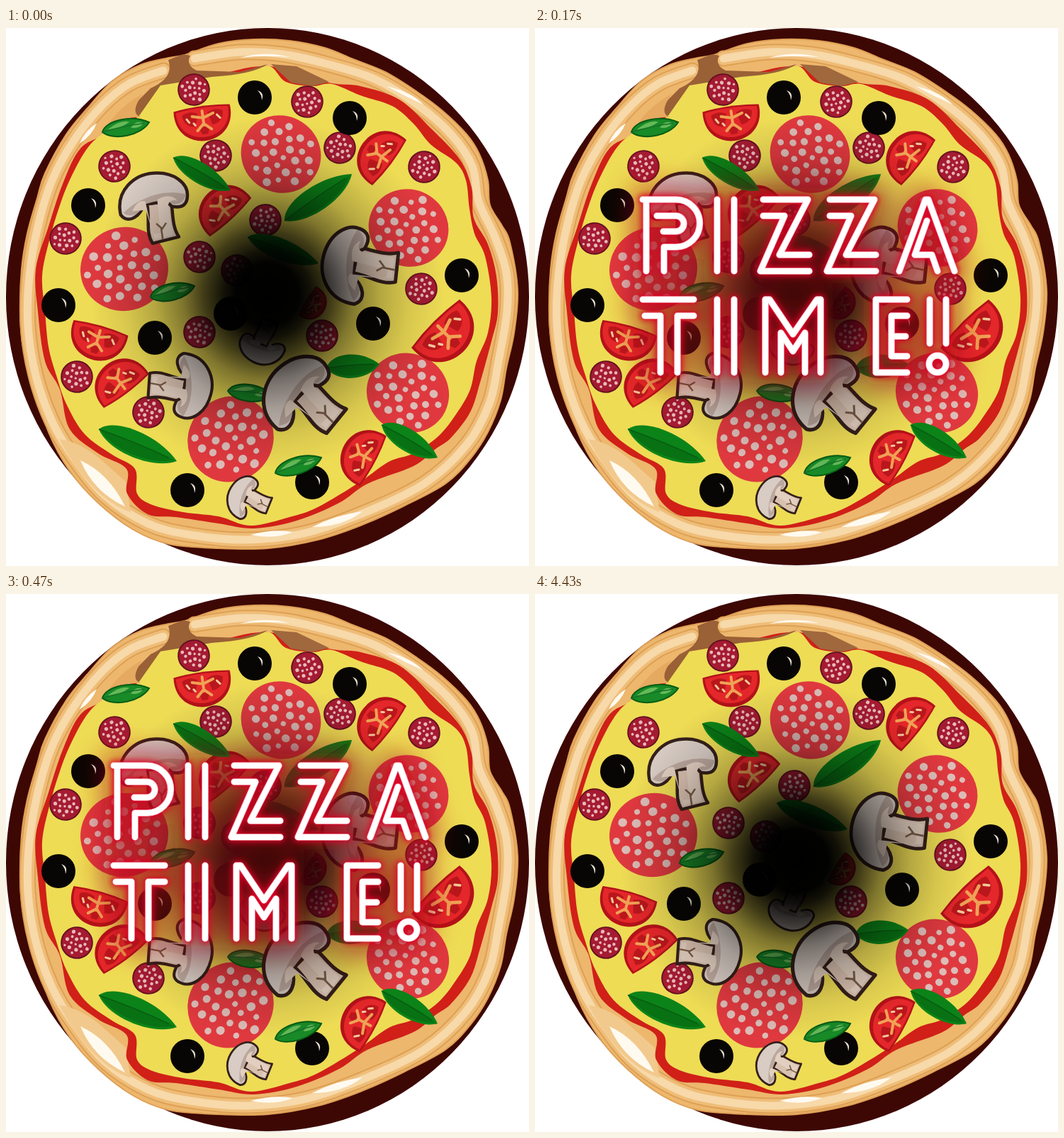
Recreate the animation shown at these times as an HTML page. Size 738 by 759 pixels, loop 5010 ms.

```html
<!DOCTYPE html>
<html lang="en">
<head>
<meta charset="utf-8">
<title>Pizza time!</title>
<style>
html, body { margin: 0; width: 100%; height: 100%; overflow: hidden; background: #fff; }
svg { display: block; width: 100vw; height: 100vh; }
</style>
</head>
<body>
<svg id="stage" viewBox="0 0 738 759" preserveAspectRatio="none"></svg>
<script>
const place = (x, y, angle, scale, art) =>
  `<g transform="translate(${x} ${y}) rotate(${angle}) scale(${scale})">${art}</g>`;
const path = (d, attrs) => `<path d="${d}" ${attrs}/>`;
const each = (list, draw) => list.map(item => draw(...item)).join('');

// Catmull-Rom curve through "x,y x,y ..." points
function smooth(text, closed = true) {
  const p = text.trim().split(/\s+/).map(s => s.split(',').map(Number));
  const n = p.length;
  const at = i => closed ? p[(i + n) % n] : p[Math.max(0, Math.min(n - 1, i))];
  let d = `M${p[0]}`;
  for (let i = 0; i < (closed ? n : n - 1); i++) {
    const [a, b, c, e] = [at(i - 1), at(i), at(i + 1), at(i + 2)];
    d += `C${b.map((v, k) => v + (c[k] - a[k]) / 6)} ${c.map((v, k) => v - (e[k] - b[k]) / 6)} ${c}`;
  }
  return closed ? d + 'Z' : d;
}

// Evenly scattered fat spots inside a slice
function spots(count, radius, size, color) {
  let out = '';
  for (let i = 0; i < count; i++) {
    const r = radius * Math.sqrt((i + .4) / count), a = i * 2.4 + .5;
    const s = size * (.75 + .45 * Math.abs(Math.sin(i * 5.3)));
    out += `<circle cx="${(r * Math.cos(a)).toFixed(1)}" cy="${(r * Math.sin(a)).toFixed(1)}" r="${s.toFixed(1)}" fill="${color}"/>`;
  }
  return out;
}

const pepperoniArt = '<circle r="57" fill="#df393f"/>' + spots(27, 49, 4.9, '#dcbcb7');
const salamiArt = '<circle r="21" fill="#a51b32" stroke="#641020" stroke-width="1.8"/>' + spots(17, 17, 2.1, '#e8b9b9');
const oliveArt = '<circle r="24" fill="#080604"/>' + path('M4,-10Q14,-7 10,4Q10,-4 4,-10Z', 'fill="#e5ddd0"');
const tomatoArt =
  path('M-40,0Q0,-6 40,0C46,62 -46,62 -40,0Z', 'fill="#b41219"') +
  path('M-37,2Q0,-3 37,2C40,54 -40,54 -37,2Z', 'fill="#e4272a"') +
  path('M-29,7Q-18,1 -7,7L-12,25Q-28,24 -29,7ZM29,7Q18,1 7,7L12,25Q28,24 29,7ZM-7,29Q0,24 7,29L4,37H-4Z', 'fill="#b9171c"') +
  path('M0,4V24M0,14L-15,10M0,14L15,9M0,22L-10,31M0,22L10,31', 'fill="none" stroke="#efa255" stroke-width="4" stroke-linecap="round"') +
  path('M-23,13l3,5M20,12l4,5M-14,20l2,3', 'stroke="#f5c89a" stroke-width="3" stroke-linecap="round"');
const mushroomArt =
  path('M-10,0C-9,24 -18,38 -10,56L28,52C20,36 25,16 24,0Z', 'fill="#d9c1b0" stroke="#35201a" stroke-width="4.5" stroke-linejoin="round"') +
  path('M-49,10C-52,-25 -22,-44 5,-42C35,-40 51,-20 48,-4C46,9 38,13 24,8L18,0L-15,0C-20,14 -40,26 -49,10Z', 'fill="#d8ccc4" stroke="#35201a" stroke-width="4.5" stroke-linejoin="round"') +
  path('M-45,8C-25,-8 15,-20 46,-6Q40,8 25,5L18,-4L-15,0Q-28,21 -45,8Z', 'fill="#bba79d"') +
  path('M-32,7Q-22,-9 -12,-4L-8,43L3,43L5,-4Q24,-12 33,1Q22,-3 19,6L20,48L-6,51L-13,8Z', 'fill="#e2cfc0"') +
  path('M5,52V36L-1,29M5,39L13,30', 'fill="none" stroke="#785a46" stroke-width="2.5"');

function leaf(x1, y1, x2, y2, width, light) {
  const dx = x2 - x1, dy = y2 - y1, len = Math.hypot(dx, dy), w = width * .72;
  const shape = `M0,0C${len * .12},${-w} ${len * .68},${-w} ${len},0C${len * .78},${w} ${len * .2},${w} 0,0Z`;
  const vein = path(`M0,0Q${len / 2},-3 ${len * .9},0`, `fill="none" stroke="${light ? '#16702a' : '#075d12'}" stroke-width="1.5"`);
  const shine = light ? path(`M${len * .12},-2Q${len * .42},${-w * .8} ${len * .6},${-w * .4}Q${len * .4},0 ${len * .12},-2ZM${len * .6},2Q${len * .75},${-w * .5} ${len * .88},0Q${len * .75},${w * .4} ${len * .6},2Z`, 'fill="#65b957"')
    : path(`M3,0Q${len / 2},-3 ${len * .96},0C${len * .75},${w * .8} ${len * .22},${w * .8} 3,0Z`, 'fill="#087113"');
  return place(x1, y1, Math.atan2(dy, dx) * 180 / Math.PI, 1,
    path(shape, light ? 'fill="#188a27" stroke="#075c14" stroke-width="2"' : 'fill="#0c8318"') + shine + vein);
}

const crust = smooth(`252,38 300,22 350,16 400,18 450,28 490,44 535,62 580,90 615,116 650,150
  668,178 680,215 683,250 700,279 711,302 722,370 717,430 706,480 698,525 680,570 655,608 620,643
  560,675 500,702 440,722 370,734 300,734 230,728 180,708 130,670 90,625 60,570 38,500 24,450
  20,400 22,340 30,290 44,240 55,205 85,150 115,113 150,75 190,52 230,42`);
const sauce = smooth(`215,82 290,68 370,54 455,77 500,82 555,101 600,142 640,185 657,225 660,268
  680,305 692,350 694,402 685,442 669,500 655,542 628,578 606,594 575,618 510,643 470,670 410,695
  350,706 300,699 240,690 200,686 171,657 170,622 130,600 90,566 76,510 55,470 45,400 42,340
  60,280 80,220 105,170 145,145`);
const cheese = smooth(`215,80 290,68 340,62 372,54 395,76 432,82 460,79 500,95 545,110 575,135
  600,165 635,190 649,215 654,255 661,290 676,322 685,380 680,430 664,470 655,510 635,545 610,576
  575,600 540,612 500,640 440,676 400,690 345,702 300,689 250,683 207,673 185,657 182,622 150,602
  111,573 85,530 71,490 60,450 55,400 51,350 61,300 76,250 92,210 116,168 142,146 185,126`);
const doughLine = smooth(`266,43 330,34 390,37 450,50 520,72 580,108 628,150 658,195 667,245
  690,295 706,345 707,400 695,470 682,530 650,588 590,643 500,686 420,713 340,722 260,715 200,699
  140,660 95,605 65,555 42,490 31,420 33,350 45,280 65,215 95,160 135,110 175,78 222,60`, false);

const dough =
  path(crust, 'fill="#edb76d" stroke="#dfa057" stroke-width="2"') +
  path(doughLine, 'fill="none" stroke="#dda054" stroke-width="23" stroke-linecap="round"') +
  path(doughLine, 'fill="none" stroke="#efbd78" stroke-width="19" stroke-linecap="round"') +
  path(doughLine, 'fill="none" stroke="#f7d9aa" stroke-width="11" stroke-linecap="round"') +
  path('M75,580Q105,584 134,609L169,640L176,683Q120,664 75,580Z', 'fill="#f2c98c"') +
  path('M105,610Q145,628 168,675Q124,655 105,610ZM104,163Q110,146 128,134Q122,151 104,163ZM330,42Q365,32 401,41Q365,38 330,42ZM432,704Q464,687 503,682Q475,704 432,704ZM345,715Q378,706 405,711Q379,722 345,715ZM537,82Q572,90 589,108Q562,96 537,82Z', 'fill="#fffaf0"');
const folds =
  path('M229,45L250,37L260,39Q253,52 269,60L330,62L369,51Q350,65 290,69L218,81L187,125L168,121L204,85Q238,70 229,45Z', 'fill="#9a6036"') +
  path('M374,51L410,54L456,76L432,82L402,77Z', 'fill="#9f683d"') +
  path('M138,146Q157,112 193,93Q173,121 191,126Q165,124 138,146Z', 'fill="#e5a960"');

const toppings =
  each([[388, 178, 1], [568, 282, 1], [167, 340, 1.09], [567, 515, 1.03], [317, 580, 1.09]],
    (x, y, s) => place(x, y, x, `${s} ${s * .95}`, pepperoniArt)) +
  each([[265, 87], [425, 104], [471, 169], [590, 196], [153, 195], [296, 180], [84, 297], [366, 271],
    [273, 323], [586, 368], [273, 429], [446, 434], [100, 492], [201, 542], [326, 342]],
    (x, y) => place(x, y, x, 1.04, salamiArt)) +
  each([[351, 98], [485, 127], [116, 250], [74, 391], [643, 349], [210, 437], [518, 417], [432, 641],
    [256, 652], [317, 403]], (x, y) => place(x, y, 0, 1, oliveArt)) +
  each([[276, 113, -8, 1], [541, 190, 127, 1], [317, 267, 137, 1], [134, 423, 16, 1], [606, 417, -45, 1.2],
    [170, 512, 143, 1], [518, 611, 118, 1], [425, 385, -60, .6]],
    (x, y, a, s) => place(x, y, a, s, tomatoArt)) +
  each([[236, 183, 317, 229, 27], [393, 272, 488, 206, 33], [341, 295, 441, 332, 28], [131, 566, 241, 611, 34],
    [530, 560, 609, 606, 29], [452, 480, 527, 474, 31], [136, 147, 202, 133, 22, true],
    [204, 380, 266, 364, 22, true], [313, 512, 376, 518, 22, true], [380, 628, 445, 606, 22, true]], leaf) +
  each([[209, 247, -8, 1], [492, 335, -78, 1.09], [252, 505, 100, .92], [415, 518, -45, 1.15],
    [362, 447, 204, .65], [339, 663, -62, .62]], (x, y, a, s) => place(x, y, a, s, mushroomArt));

const zed = x => `M${x},242h63l-40,78h42M${x},265h30l-34,78h69`;
const lettering = 'M152,242H199a33.5,33.5 0 0 1 0,67H182V343M157,242V343M172,265H199a11,11 0 0 1 0,22H181' +
  'M257,242V343M281,242V343' + zed(322) + zed(416) +
  'M514,343L551,242H555L592,343M553,272L536,320H560L568,343' +
  'M152,383H224M155,406H177V486M224,406H201V486M257,383V486M281,383V486' +
  'M325,486V383H331L364,432L398,383H403V486M347,486V430L364,456L381,430V486' +
  'M525,383H481V486H525M525,406H503V463H525M503,435H523' +
  'M557,383V445M580,383V445M556,474a12,12 0 1 0 24,0a12,12 0 1 0 -24,0';
const tube = (color, width, extra = '') => path(lettering, `stroke="${color}" stroke-width="${width}" ${extra}`);

const shade = [[0, 1], [45, .99], [62, .92], [90, .73], [120, .47], [160, .24], [200, .1], [250, 0]]
  .map(([r, o]) => `<stop offset="${r / 250}" stop-opacity="${o}"/>`).join('');

document.getElementById('stage').innerHTML = `
  <defs>
    <radialGradient id="shade" gradientUnits="userSpaceOnUse" cx="369" cy="376" r="250">${shade}</radialGradient>
    <filter id="halo" filterUnits="userSpaceOnUse" x="0" y="80" width="738" height="570"><feGaussianBlur stdDeviation="20"/></filter>
    <filter id="edge" filterUnits="userSpaceOnUse" x="100" y="190" width="540" height="350"><feGaussianBlur stdDeviation="4"/></filter>
  </defs>
  <ellipse cx="369" cy="379" rx="369" ry="379" fill="#3d0704"/>
  ${dough}${path(sauce, 'fill="#d02018"')}${path(cheese, 'fill="#eedc55"')}${folds}${toppings}
  <circle cx="369" cy="376" r="250" fill="url(#shade)"/>
  <g id="neon" role="img" aria-label="PIZZA TIME!" fill="none" stroke-linecap="round" stroke-linejoin="round">
    ${tube('#a90719', 34, 'filter="url(#halo)" opacity=".65"')}
    ${tube('#e00025', 13, 'filter="url(#edge)"')}
    ${tube('#f7a3b0', 9.5)}${tube('#fff', 8)}
  </g>`;

// Neon brightness from each moment on, in ms
const flicker = [[0, 0], [30, .35], [60, .7], [100, 1], [130, .45], [170, 1], [230, 0],
  [370, .2], [400, .45], [430, .75], [470, 1], [4100, 0]];
const neon = document.getElementById('neon');
const start = performance.now();
function draw() {
  const time = (performance.now() - start) % 5010;
  neon.setAttribute('opacity', flicker.findLast(([from]) => from <= time)[1]);
  requestAnimationFrame(draw);
}
draw();
</script>
</body>
</html>
```
